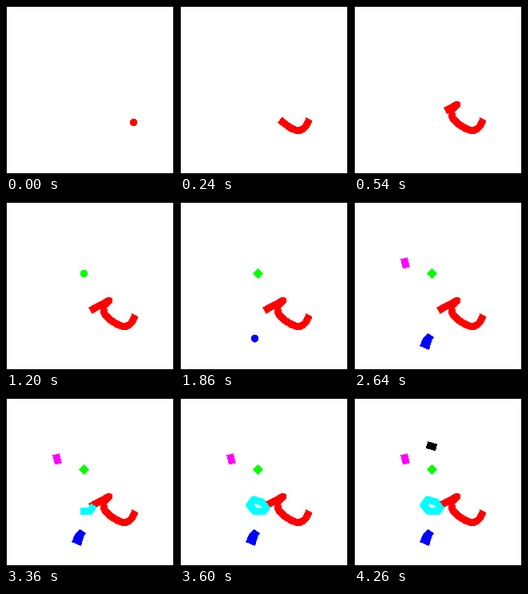
Recreate the animation shown at these times as an HTML page. Size 210 by 210 pixels, loop 4.86 s.

```html
<!DOCTYPE html>
<html lang="en">
<head>
<meta charset="utf-8">
<title>Brush strokes</title>
<style>
  html, body { margin: 0; width: 100%; height: 100%; overflow: hidden; background: #fff; }
  svg { display: block; width: 100%; height: 100%; }
</style>
</head>
<body>
<svg id="stage" viewBox="0 0 210 210" shape-rendering="crispEdges">
  <rect width="210" height="210" fill="#000"/>
  <rect x="1" y="1" width="208" height="208" fill="#fff"/>
</svg>
<script>
const LOOP = 4860, STEP = 60, WIDTH = 9;

// Each stroke begins as a dot, then gains one point per step.
// "smooth" counts the leading points joined by a curve; "fill" is the finished outline.
const strokes = [
  { start: 0, color: '#f00', smooth: 9, points: [
    [161.5, 141.2], [157.5, 149.8], [150, 155.5], [139, 152.8], [124.8, 142.2],
    [122, 134.5], [122.5, 130], [125.5, 126.5], [129, 123.2], [114, 131], [105.3, 135.8]] },
  { start: 1200, color: '#0f0', points: [[94.3, 92.7], [100.7, 86.3]] },
  { start: 1860, color: '#00f', points: [[96, 167], [91, 174.5], [88, 182.5]],
    fill: [[92.5, 164], [100, 169], [97, 174], [94, 185], [82, 180], [86, 171]] },
  { start: 2580, color: '#f0f', points: [[62.5, 70.5], [65.5, 82.5]] },
  { start: 3240, color: '#0ff', points: [
    [110, 134], [105, 141.5], [93, 141.5], [87, 134], [92, 127], [102, 130], [107, 136]] },
  { start: 4200, color: '#000', points: [[91, 58.5], [103, 62]] }
];

const stage = document.getElementById('stage');

function add(tag, attrs) {
  const el = document.createElementNS('http://www.w3.org/2000/svg', tag);
  for (const key in attrs) el.setAttribute(key, attrs[key]);
  stage.append(el);
  return el;
}

function linePath(points, smooth = 0) {
  let d = 'M' + points[0];
  const curve = points.slice(0, smooth);
  for (let i = 1; i < points.length; i++) {
    const p = points[i];
    if (i >= smooth) {
      d += 'L' + p;
      continue;
    }
    const a = points[i - 1];
    const before = curve[i - 2] || a;
    const after = curve[i + 1] || p;
    const c1 = a.map((v, k) => v + (p[k] - before[k]) / 6);
    const c2 = p.map((v, k) => v - (after[k] - a[k]) / 6);
    d += `C${c1} ${c2} ${p}`;
  }
  return d;
}

for (const s of strokes) {
  const [a, b] = s.points;
  s.dot = add('circle', { cx: (a[0] + b[0]) / 2, cy: (a[1] + b[1]) / 2, r: 4.75, fill: s.color });
  s.line = add('path', { fill: 'none', stroke: s.color, 'stroke-width': WIDTH, 'stroke-linejoin': 'round' });
  s.step = null;
}

function update(s, time) {
  const last = s.points.length - 1;
  const step = Math.min(last, Math.floor((time - s.start) / STEP));
  if (step === s.step) return;
  s.step = step;
  s.dot.style.display = step === 0 ? '' : 'none';
  const outline = s.fill && step === last;
  s.line.setAttribute('fill', outline ? s.color : 'none');
  s.line.setAttribute('stroke', outline ? 'none' : s.color);
  s.line.setAttribute('d', step < 1 ? '' :
    outline ? linePath(s.fill) + 'Z' : linePath(s.points.slice(0, step + 1), s.smooth));
}

let origin;
function frame(now) {
  origin ??= now;
  const time = (now - origin) % LOOP;
  strokes.forEach(s => update(s, time));
  requestAnimationFrame(frame);
}

strokes.forEach(s => update(s, 0));
requestAnimationFrame(frame);
</script>
</body>
</html>
```
